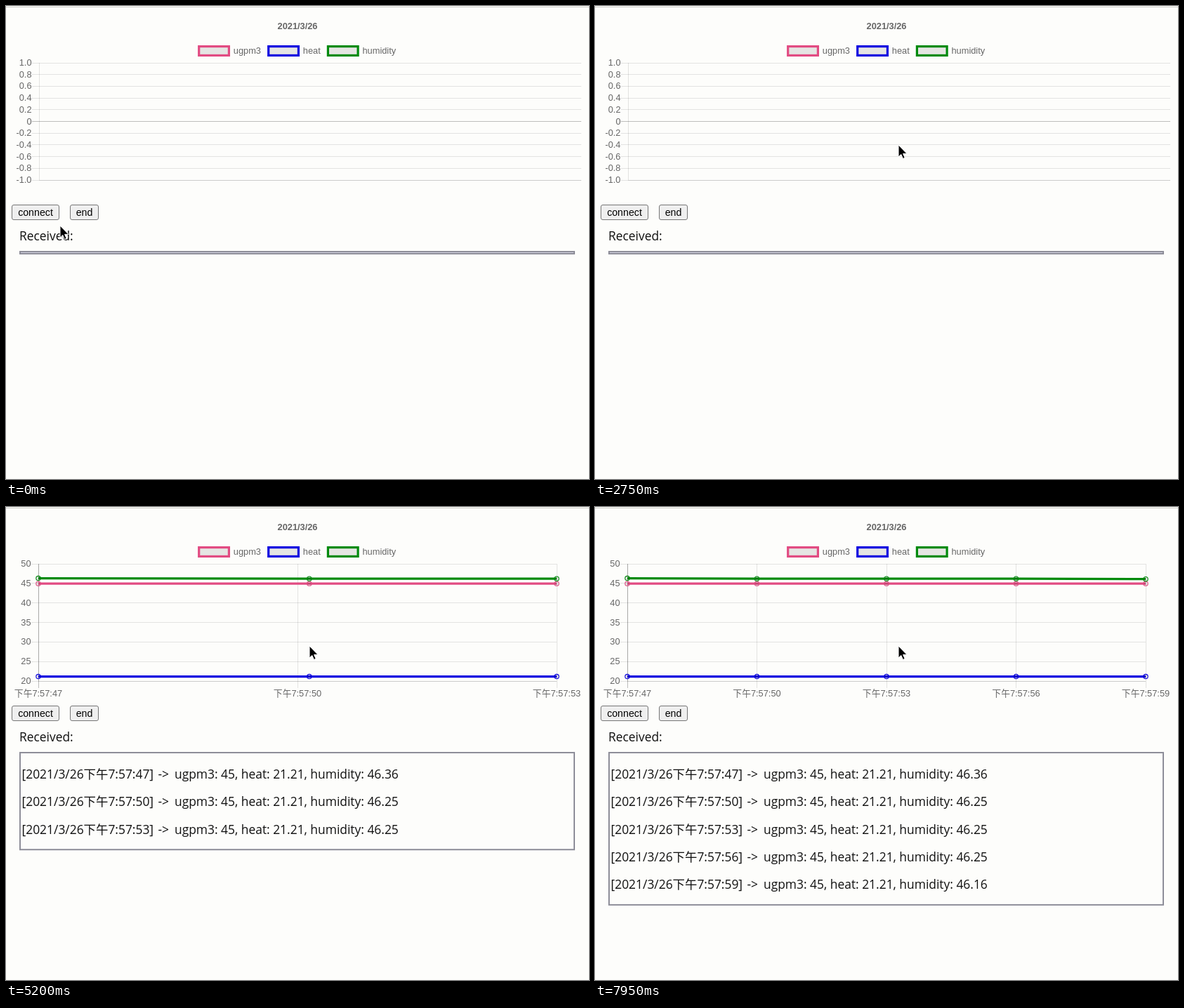
Animation, 830 px wide and 674 px high, one loop 8 s. Source, as an HTML page:

```html
<!DOCTYPE html>
<html lang="en">
<head>
<meta charset="utf-8">
<title>Serial sensor chart</title>
<style>
  html, body { margin: 0; width: 100%; height: 100%; overflow: hidden; background: #fdfdfb; }
  svg { display: block; }
  .chart { font: 12.8px "Liberation Sans", "Noto Sans CJK SC", sans-serif; fill: #666; }
  .title { font-weight: bold; }
  .button { font: 14.2px "Liberation Sans", sans-serif; fill: #000; }
  .page { font: 17.4px "Open Sans", "Noto Sans CJK SC", sans-serif; fill: #111; }
  .heading { font: bold 15px "Noto Sans CJK SC", sans-serif; fill: #222; }
  .item { font: 12.4px "Open Sans", sans-serif; fill: #222; }
  .action { font: 13px "Noto Sans CJK SC", sans-serif; fill: #222; }
  .light { fill: #fff; }
  .dialog { filter: drop-shadow(0 4px 9px rgba(0, 0, 0, .42)); }
</style>
</head>
<body>
<svg id="stage" width="830" height="674" viewBox="0 0 830 674"></svg>
<script>
const LOOP = 8000, STEP = 50;
const FIRST_READING = 3049, READING_GAP = 987, EASE_TIME = 329;
const DIALOG_OPEN = 400, ITEM_PICKED = 1150, DIALOG_CLOSE = 2150;
const TOP = 81, BOTTOM = 248, RIGHT = 819;

const readings = [46.36, 46.25, 46.25, 46.25, 46.16].map((humidity, i) => ({
  time: `下午7:57:${47 + 3 * i}`, ugpm3: 45, heat: 21.21, humidity
}));
const series = [
  { name: "ugpm3", color: "#e24b82", x: 274.7 },
  { name: "heat", color: "#0a00e0", x: 373.7 },
  { name: "humidity", color: "#008a0c", x: 458.4 }
];
// time, x, y of the pointer tip
const pointerPath = [
  [0, 77, 313], [100, 77, 313], [350, 49, 297], [600, 49, 297], [900, 170, 60],
  [1250, 170, 60], [1800, 442, 195], [2150, 442, 195], [2300, 432, 198], [LOOP, 432, 198]
];

const clamp = v => Math.min(1, Math.max(0, v));
const text = (x, y, cls, str, anchor = "start") =>
  `<text x="${x}" y="${y}" class="${cls}" text-anchor="${anchor}">${str.replace(">", "&gt;")}</text>`;
const rect = (x, y, w, h, fill, extra = "") =>
  `<rect x="${x}" y="${y}" width="${w}" height="${h}" fill="${fill}" ${extra}/>`;
const line = (x1, y1, x2, y2, alpha = .1) =>
  `<path d="M${x1} ${y1}L${x2} ${y2}" stroke="#000" stroke-opacity="${alpha}"/>`;
const crisp = v => Math.floor(v) + .5;

function pointerAt(t) {
  const i = pointerPath.findIndex(k => k[0] > t);
  const [t0, x0, y0] = pointerPath[i - 1], [t1, x1, y1] = pointerPath[i];
  const p = (t - t0) / (t1 - t0), e = p * p * (3 - 2 * p);
  return [x0 + (x1 - x0) * e, y0 + (y1 - y0) * e];
}

const slot = (i, count) => 46 + (count > 1 ? 738 * i / (count - 1) : 0);

function axes(count) {
  const left = count ? 46 : 47;
  const right = count > 1 ? 784 : RIGHT;
  const ticks = count
    ? [50, 45, 40, 35, 30, 25, 20].map(String)
    : Array.from({ length: 11 }, (_, i) => i === 5 ? "0" : (1 - i / 5).toFixed(1));
  let out = "";
  ticks.forEach((label, i) => {
    const y = TOP + (BOTTOM - TOP) * i / (ticks.length - 1);
    out += line(left - 10, crisp(y), right, crisp(y), label === "0" ? .25 : .1);
    out += text(left - 10.5, y + 4, "chart", label, "end");
  });
  for (let i = 0; i < count; i++) {
    const x = slot(i, count);
    out += line(crisp(x), TOP, crisp(x), BOTTOM + 10, i ? .1 : .25);
    out += text(x, 269.7, "chart", readings[i].time, "middle");
  }
  return out + line(left + .5, TOP, left + .5, BOTTOM) + line(left, BOTTOM + .5, right, BOTTOM + .5);
}

function plot(count, age) {
  const ease = 1 - (1 - clamp(age / EASE_TIME)) ** 4;
  return series.map(({ name, color }) => {
    const points = readings.slice(0, count).map((r, i) => {
      const to = slot(i, count);
      const from = i < count - 1 ? slot(i, count - 1) : to;
      return [from + (to - from) * ease, TOP + .3 + (50 - r[name]) / 30 * (BOTTOM - TOP)];
    });
    return `<polyline points="${points.join(" ")}" fill="none" stroke="${color}" stroke-width="3.2"/>` +
      points.map(([x, y]) =>
        `<circle cx="${x}" cy="${y}" r="3.2" fill="#000" fill-opacity=".1" stroke="${color}" stroke-width="1.07"/>`
      ).join("");
  }).join("");
}

const legend = () => series.map(({ name, color, x }) =>
  rect(x, 57.6, 42.7, 12.8, "#e5e5e3", `stroke="${color}" stroke-width="3.2"`) +
  text(x + 49.1, 68, "chart", name)).join("");

function button(x, w, label, [px, py]) {
  const hover = px > x && px < x + w && py > 283 && py < 305;
  return rect(x + .5, 283.5, w - 1, 21, hover ? "#e2e2e2" : "#efefef",
    `rx="2.5" stroke="${hover ? "#4c4c5c" : "#767676"}"`) +
    text(x + w / 2, 299, "button", label, "middle");
}

function log(count) {
  const height = count ? 59.5 + 39.35 * (count - 1) : 3;
  const frame = rect(20, 350, 789, height, count ? "none" : "#d4d4e2", 'stroke="#8e8e99" stroke-width="2"');
  return frame + readings.slice(0, count).map((r, i) => {
    const y = 387 + 39.35 * i;
    return text(22.5, y, "page", `[2021/3/26${r.time}]`) +
      text(216.5, y, "page", "->") +
      text(240, y, "page", `ugpm3: ${r.ugpm3}, heat: ${r.heat}, humidity: ${r.humidity}`);
  }).join("");
}

function dialog(picked) {
  return `<path class="dialog" d="M102 -20H579V234q0 4-4 4H106q-4 0-4-4Z" fill="#fdfdfb"/>` +
    text(119, 29, "heading", "file:// 想要连接到串行端口") +
    (picked ? rect(120, 43, 441, 30, "#c5c5c5") : "") +
    rect(119.5, 42.5, 442, 127, "none", 'stroke="#c6c6d8"') +
    text(133, 62.5, "item", "USB-SERIAL CH340 (COM6)") +
    rect(417, 187, 68, 34, picked ? "#0864aa" : "#b3d7ef", 'rx="2"') +
    text(451, 208.5, "action light", "连接", "middle") +
    rect(494, 187, 68, 34, "#ebebec", 'rx="2"') +
    text(528, 208.5, "action", "取消", "middle");
}

const pointer = ([x, y]) =>
  `<path transform="translate(${x} ${y})" d="M0 0V17L3.8 13.5L6.5 19.5L9.2 18.3L6.6 12.4H12Z"
    fill="#000" stroke="#fff" stroke-width="1"/>`;

function render(t) {
  const count = Math.min(readings.length, Math.max(0, Math.floor((t - FIRST_READING) / READING_GAP) + 1));
  const age = t - FIRST_READING - (count - 1) * READING_GAP;
  const tip = pointerAt(t);
  return rect(0, 0, 830, 674, "#fdfdfb") + rect(0, 1, 830, 1, "#cfcfca") +
    text(415, 33, "chart title", "2021/3/26", "middle") +
    legend() + axes(count) + plot(count, age) +
    button(8, 68, "connect", tip) + button(91, 41, "end", tip) +
    text(19, 334, "page", "Received:") + log(count) +
    (t >= DIALOG_OPEN && t < DIALOG_CLOSE ? dialog(t >= ITEM_PICKED) : "") +
    pointer(tip);
}

const stage = document.getElementById("stage");
const start = performance.now();
let shown = -1;
function tick() {
  const elapsed = Math.max(0, performance.now() - start) % LOOP;
  const t = Math.floor(elapsed / STEP) * STEP;
  if (t !== shown) stage.innerHTML = render(shown = t);
  requestAnimationFrame(tick);
}
tick();
</script>
</body>
</html>
```
